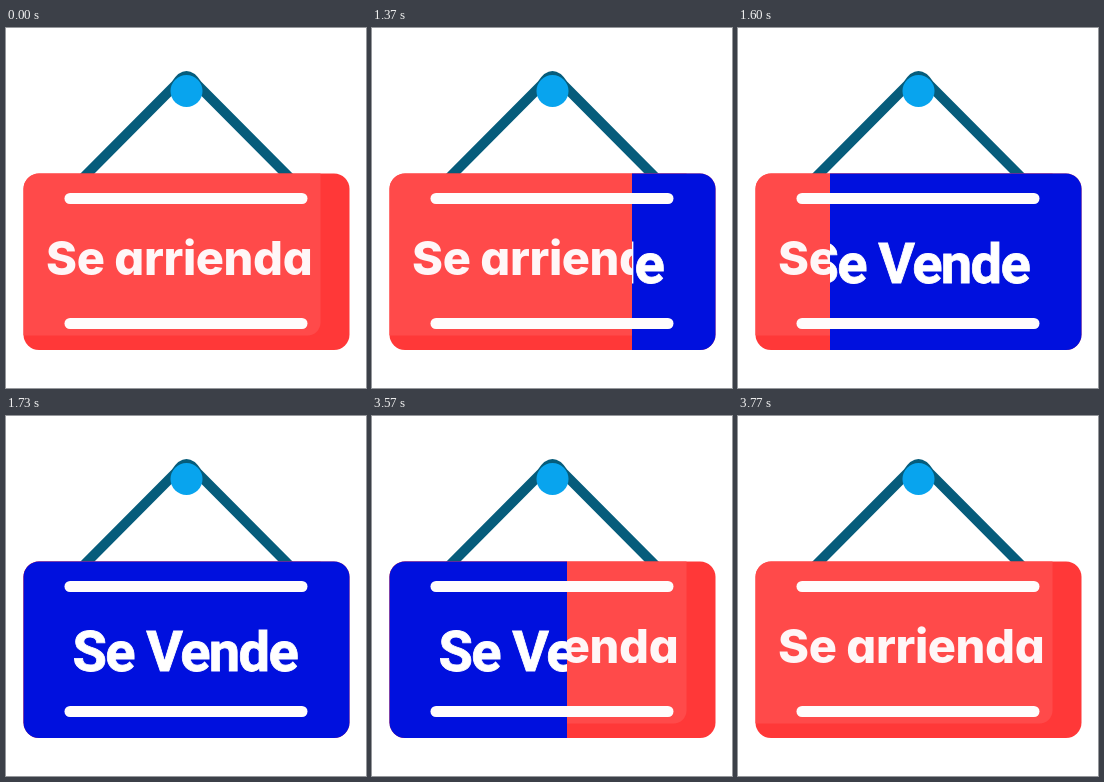
An HTML page for the animation above (4130 ms loop, 360 by 360 pixels).

```html
<!DOCTYPE html>
<html lang="es">
<head>
<meta charset="utf-8">
<title>Letrero</title>
<style>
  html, body { margin: 0; width: 100%; height: 100%; overflow: hidden; background: #fff; }
  svg { display: block; width: 100vw; height: 100vh; }
  .rent { font: 800 47px Inter, sans-serif; font-feature-settings: "cv11"; letter-spacing: -0.4px; }
  .sale { font: 700 56px Roboto, sans-serif; letter-spacing: -1.6px; stroke: #fff; stroke-width: 0.8; }
</style>
</head>
<body>
<svg viewBox="0 0 360 360">
  <defs>
    <clipPath id="board"><rect x="17.5" y="145.5" width="326" height="176.5" rx="15.5"/></clipPath>
    <clipPath id="wipe"><rect id="window" y="0" width="360" height="360"/></clipPath>
  </defs>

  <path d="M77 150 L170 56.5 Q180.5 39.5 191 56.5 L284 150" fill="none" stroke="#065c7b" stroke-width="10"/>
  <circle cx="180.5" cy="63" r="16" fill="#08a4ee"/>

  <g clip-path="url(#board)">
    <rect y="140" width="360" height="190" fill="#ff3838"/>
    <rect y="120" width="314.5" height="187.5" rx="13" fill="#ff4a4a"/>
    <text class="rent" x="40" y="246.5" fill="#fff6f7">Se arrienda</text>
    <g clip-path="url(#wipe)">
      <rect y="140" width="360" height="190" fill="#0010de"/>
      <text class="sale" x="66.5" y="254.5" fill="#fff">Se Vende</text>
    </g>
    <g fill="#fffcfc">
      <rect x="58.5" y="165" width="243" height="11" rx="5.5"/>
      <rect x="58.5" y="290" width="243" height="11" rx="5.5"/>
    </g>
  </g>
</svg>
<script>
  const LOOP = 4130, TICK = 100 / 3;
  const pane = document.getElementById("window");

  // Wipe edge, moving left in 30 fps ticks
  const edge = (t, start, from, step) =>
    Math.max(0, Math.min(360, from - step * Math.floor((t - start) / TICK)));

  function draw(t) {
    let left = 360, right = 360;
    if (t >= 1270) left = edge(t, 1263, 332, 24);
    if (t >= 3400) right = edge(t, 3396, 345, 30);
    if (t >= 3770) right = 0;
    pane.setAttribute("x", left);
    pane.setAttribute("width", Math.max(0, right - left));
  }

  const start = performance.now();
  function frame() {
    draw((performance.now() - start) % LOOP);
    requestAnimationFrame(frame);
  }
  draw(0);
  requestAnimationFrame(frame);
</script>
</body>
</html>
```
